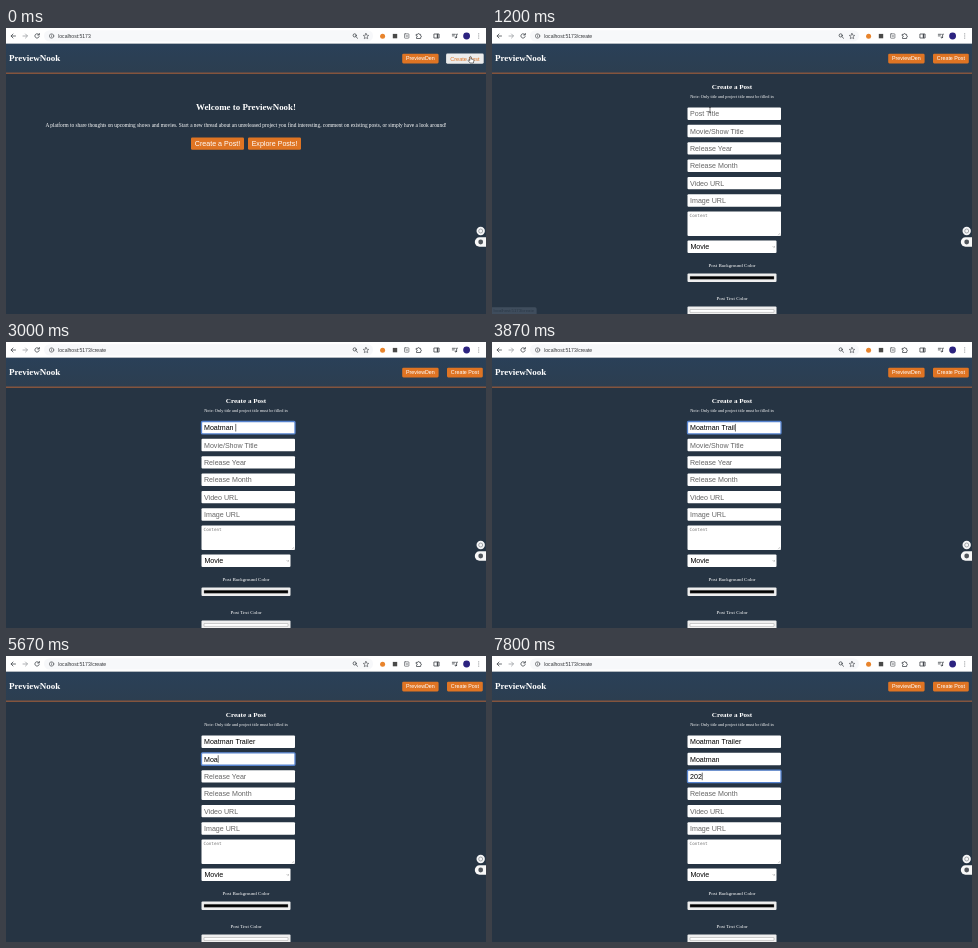
These frames come from a looping animation (480 by 286 pixels, 8 s). An HTML page:

```html
<!DOCTYPE html>
<html lang="en">
<head>
<meta charset="utf-8">
<title>Create a Post</title>
<style>
  html, body { margin: 0; width: 100%; height: 100%; overflow: hidden; background: #263443; }
  svg { display: block; width: 100vw; height: 100vh; }
  text { white-space: pre; }
  .sans { font-family: "Liberation Sans", Arial, sans-serif; }
  .serif { font-family: "Liberation Serif", Times, serif; fill: #fff; }
  .mono { font-family: "DejaVu Sans Mono", monospace; }
  .bold { font-weight: bold; }
  .mid { text-anchor: middle; }
  .icon { fill: none; stroke: #45494e; stroke-width: .8; stroke-linecap: round; stroke-linejoin: round; }
</style>
</head>
<body>
<svg viewBox="0 0 480 286" preserveAspectRatio="none">
  <defs>
    <linearGradient id="headerFill" x2="0" y2="1">
      <stop stop-color="#2a4058"/><stop offset="1" stop-color="#2c3e50"/>
    </linearGradient>
  </defs>
  <rect width="480" height="286" fill="#263443"/>

  <g id="toolbar">
    <rect width="480" height="15.8" fill="#fff"/>
    <rect x="38" y="2.2" width="329" height="11.4" rx="5.7" fill="#f7f8fa"/>
    <g class="icon">
      <path d="M9.5 8H5.2M7 6 5 8l2 2"/>
      <path d="M17 8h4.3M19.5 6l2 2-2 2" stroke="#9a9da1"/>
      <path d="M33 6.8A2.2 2.2 0 1 0 33.2 8.6M33.3 5.4V7h-1.6"/>
      <circle cx="45.6" cy="8" r="2.2" stroke-width=".6"/><path d="M45.6 7.8v1.2M45.6 6.8v.1" stroke-width=".6"/>
      <circle cx="348.7" cy="7.4" r="1.6"/><path d="M350 8.7l1.6 1.6"/>
      <path d="M360 5.4l.8 1.8 2 .2-1.5 1.3.4 2-1.7-1-1.7 1 .4-2-1.5-1.3 2-.2z" stroke-width=".6"/>
      <rect x="398.5" y="5.8" width="4.4" height="4.4" rx=".6" stroke-width=".6"/><path d="M400 8h1.5"/>
      <path d="M410.5 6.4h1.2a.8.8 0 0 1 1.7 0h1.2v1.3a.8.8 0 0 1 0 1.6v1.2h-4.1V9.200a.8.8 0 0 0 0-1.600z"/>
      <rect x="428.300" y="6" width="4.800" height="4"/><path d="M431.500 6.500v3" stroke-width="1.400"/>
      <path d="M446.300 6.300h3M446.300 7.900h2M450.600 9.300V6.200h.9"/><circle cx="449.800" cy="9.500" r=".6"/>
    </g>
    <circle cx="376.600" cy="8.200" r="2.500" fill="#e8842c"/>
    <rect x="386.800" y="5.900" width="4.400" height="4.400" fill="#4a4a48"/>
    <circle cx="460.600" cy="8" r="3.400" fill="#2c2380"/>
    <path d="M472.700 5.900v.01M472.700 8v.01M472.700 10.100v.01" class="icon" stroke-width="1"/>
    <text id="address" class="sans" x="52.200" y="9.800" font-size="5.050" fill="#303236"></text>
  </g>

  <rect y="15.800" width="480" height="29" fill="url(#headerFill)"/>
  <rect y="44.700" width="480" height=".9" fill="#c0693a"/>
  <text class="serif bold" x="3" y="33.400" font-size="9">PreviewNook</text>
  <g id="nav"></g>
  <g id="home"></g>
  <g id="create"></g>

  <g id="status">
    <path d="M0 279.300h43a1.600 1.600 0 0 1 1.600 1.600V286H0z" fill="#d5e2f5"/>
    <text class="sans" x="1.600" y="284.300" font-size="4.250" fill="#3a4452">localhost:5173/create</text>
  </g>

  <g id="widgets">
    <circle cx="474.700" cy="203" r="4.200" fill="#f4f5f6"/>
    <circle cx="474.700" cy="203" r="2" fill="none" stroke="#85898e" stroke-width=".7"/>
    <path d="M480 209.300h-6.500a4.700 4.700 0 0 0 0 9.400H480z" fill="#f8f8f8"/>
    <circle cx="474.700" cy="214" r="2.400" fill="#51565c"/>
  </g>

  <path id="hand" d="M-.6 0Q0-.7.6 0V2.200l2.200.5q.7.300.6 1l-.5 2.500H-.5L-2.300 3.800q0-.9.700-.7l1 .6z"
        fill="#fff" stroke="#222" stroke-width=".55"/>
  <path id="beam" d="M-1-2.800Q0-2.800 0-2 0-2.800 1-2.800M0-2V2M-1 2.800Q0 2.800 0 2 0 2.800 1 2.800"
        fill="none" stroke="#222" stroke-width=".6"/>
</svg>

<script>
const LOOP = 8000;
const PAGE_OPEN = 140;
const NAV_LEAVE = 940;
const ORANGE = "#df7423";
const $ = id => document.getElementById(id);

function add(parent, tag, attrs, content = "") {
  const node = document.createElementNS("http://www.w3.org/2000/svg", tag);
  for (const key in attrs) node.setAttribute(key, attrs[key]);
  node.textContent = content;
  return parent.appendChild(node);
}
const box = (parent, x, y, width, height, fill = "#fff", rx = 1) =>
  add(parent, "rect", { x, y, width, height, fill, rx });
const label = (parent, cls, x, y, size, content, fill) =>
  add(parent, "text", { class: cls, x, y, "font-size": size, ...(fill && { fill }) }, content);

function button(parent, x, y, width, height, size, caption) {
  const group = add(parent, "g", {});
  const back = box(group, x, y, width, height, ORANGE, 1.3);
  const text = label(group, "sans mid", x + width / 2, y + height / 2 + size * .35, size, caption, "#fff");
  return { group, back, text };
}

const nav = $("nav"), home = $("home"), create = $("create");
button(nav, 396.2, 25.8, 36.4, 9.6, 5.33, "PreviewDen");
const navCreate = button(nav, 441, 25.8, 35.8, 9.6, 5.33, "Create Post");

label(home, "serif bold mid", 240, 82, 8.9, "Welcome to PreviewNook!");
label(home, "serif mid", 240, 98.7, 5.33,
  "A platform to share thoughts on upcoming shows and movies. Start a new thread about an unreleased project " +
  "you find interesting, comment on existing posts, or simply have a look around!");
button(home, 185, 109.4, 53, 12.4, 7.1, "Create a Post!");
button(home, 242, 109.4, 53, 12.4, 7.1, "Explore Posts!");

label(create, "serif bold mid", 240, 61.3, 7.1, "Create a Post");
label(create, "serif mid", 240, 69.6, 4.28, "Note: Only title and project title must be filled in");

const hints = ["Post Title", "Movie/Show Title", "Release Year", "Release Month", "Video URL", "Image URL"];
const fields = hints.map((hint, i) => {
  const y = 79.5 + 17.35 * i;
  const frame = box(create, 195.5, y, 93.5, 12.4);
  return { hint, y, frame, text: label(create, "sans", 198, y + 8.7, 7.1, hint) };
});
const caret = box(create, 0, 0, .6, 7.6, "#111", 0);

box(create, 195.5, 183.4, 93.5, 24.6);
label(create, "mono", 197.6, 189.3, 4.3, "Content", "#757575");
add(create, "path", { d: "M286 207.200l2.200-2.200M287.400 207.200l.8-.8", stroke: "#888", "stroke-width": .4 });
box(create, 195.5, 212.6, 89, 12.4);
label(create, "sans", 198.4, 221.4, 7.1, "Movie", "#000");
add(create, "path", { d: "M281 218.500l.9.900.9-.9", fill: "none", stroke: "#333", "stroke-width": .5 });

function colorInput(y, caption, color) {
  label(create, "serif mid", 240, y - 6.4, 5, caption);
  box(create, 195.5, y, 89, 8.6, "#efefef");
  const swatch = box(create, 198, y + 2.9, 84, 2.9, color, .3);
  swatch.setAttribute("stroke", "#777");
  swatch.setAttribute("stroke-width", .35);
}
colorInput(245.4, "Post Background Color", "#000");
colorInput(278.6, "Post Text Color", "#fff");

// Each entry: click time, typed value, time of every key.
const entries = [
  { click: 1800, value: "Moatman Trailer",
    keys: [2200, 2330, 2470, 2600, 2730, 2870, 2930, 3000, 3330, 3530, 3670, 3800, 3870, 3930, 4070] },
  { click: 5130, value: "Moatman", keys: [5400, 5530, 5670, 5800, 5930, 6070, 6200] },
  { click: 7130, value: "202", keys: [7470, 7670, 7800] }
];

// Pointer stops: time, x, y.
const stops = [
  [0, 464.5, 28.8], [870, 464.5, 28.8], [1200, 218, 82], [1730, 219, 86],
  [4270, 219, 87], [4670, 225, 103], [5070, 225.5, 103.5],
  [6270, 225.5, 104], [6730, 230.5, 119], [7070, 231, 120.5], [LOOP, 231, 120.5]
];
function pointerAt(t) {
  const i = Math.max(1, stops.findIndex(stop => stop[0] > t));
  const [a, b] = [stops[i - 1], stops[i]];
  const u = (t - a[0]) / (b[0] - a[0]);
  const ease = u * u * (3 - 2 * u);
  return [1, 2].map(k => a[k] + (b[k] - a[k]) * ease);
}

const show = (node, on) => node.setAttribute("display", on ? "inline" : "none");
const place = (node, x, y) => node.setAttribute("transform", `translate(${x} ${y})`);

function drawFields(t) {
  const active = entries.filter(entry => t >= entry.click).length - 1;
  fields.forEach((field, i) => {
    const entry = entries[i];
    const count = entry ? entry.keys.filter(key => t >= key).length : 0;
    field.text.textContent = count ? entry.value.slice(0, count) : field.hint;
    field.text.setAttribute("fill", count ? "#000" : "#666");
    field.frame.setAttribute("stroke", i === active ? "#5683cf" : "none");
    field.frame.setAttribute("stroke-width", 1.3);
    if (i !== active) return;
    const lastKey = count ? entry.keys[count - 1] : entry.click;
    const width = count ? field.text.getComputedTextLength() : 0;
    place(caret, 198 + width, field.y + 2.4);
    show(caret, (t - lastKey) % 1000 < 500);
  });
  if (active < 0) show(caret, false);
}

function drawPointer(t) {
  const [x, y] = pointerAt(t);
  const typing = entries.some((entry, i) => t >= entry.keys[0] && t < [4270, 6270, LOOP][i]);
  const overNav = t < NAV_LEAVE;
  place($("hand"), x, y);
  place($("beam"), x, y);
  show($("hand"), overNav);
  show($("beam"), !overNav && !typing);
  navCreate.back.setAttribute("fill", overNav ? "#ececec" : ORANGE);
  navCreate.text.setAttribute("fill", overNav ? ORANGE : "#fff");
  navCreate.group.setAttribute("transform",
    overNav ? "translate(458.900 30.600) scale(1.05) translate(-458.900 -30.600)" : "");
}

function draw(t) {
  const opened = t >= PAGE_OPEN;
  show(home, !opened);
  show(create, opened);
  $("address").textContent = "localhost:5173" + (opened ? "/create" : "");
  const fade = Math.min(1, Math.max(0, (1230 - t) / 200));
  $("status").setAttribute("opacity", t < 200 ? 0 : fade);
  drawFields(t);
  drawPointer(t);
}

const start = performance.now();
function tick() {
  draw((performance.now() - start) % LOOP);
  requestAnimationFrame(tick);
}
tick();
</script>
</body>
</html>
```
